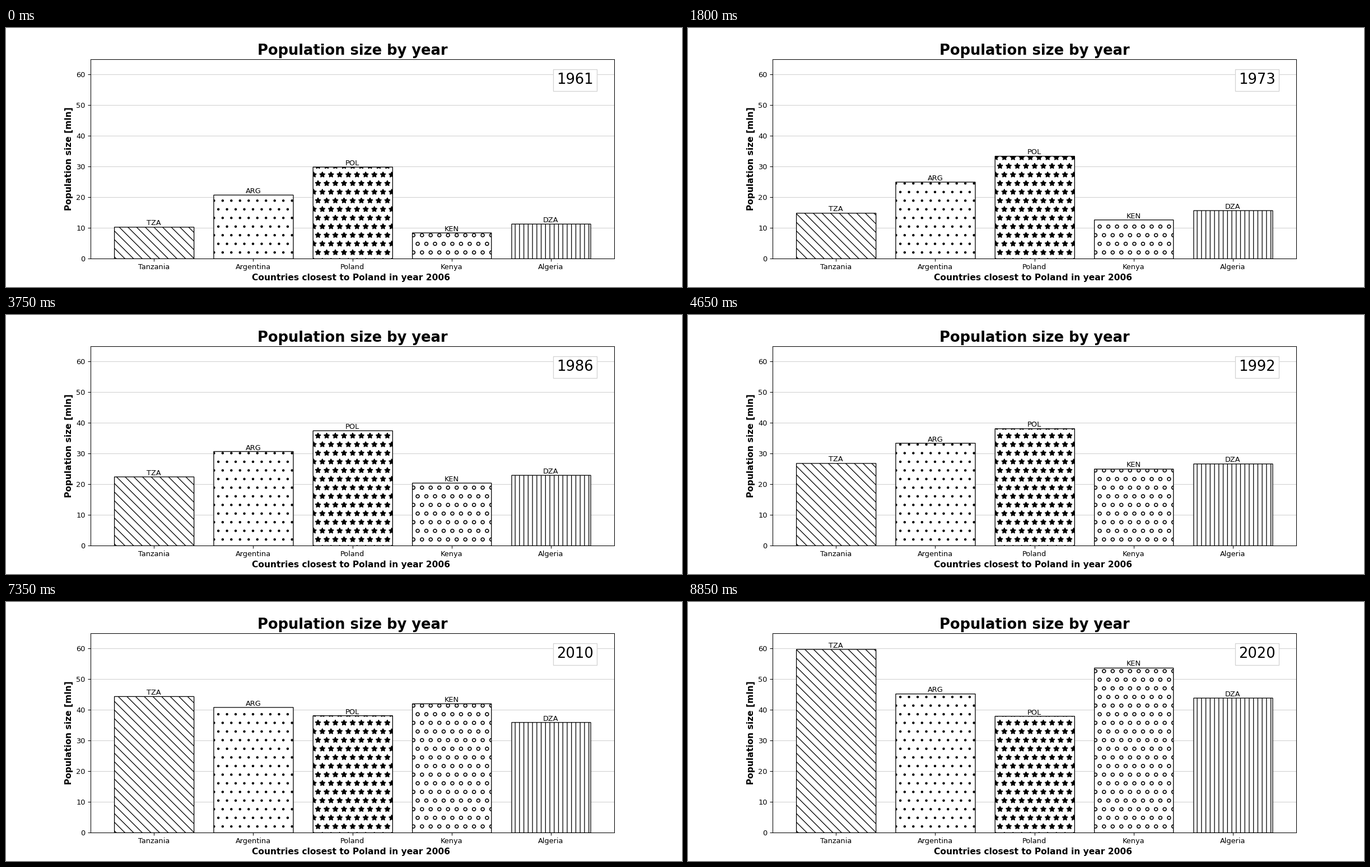
A matplotlib script for the animation above (9 s loop, 1207 by 464 pixels).

```python
import matplotlib.pyplot as plt
import numpy as np
from matplotlib.animation import FuncAnimation
from matplotlib.patches import PathPatch
from matplotlib.path import Path
from matplotlib.transforms import Affine2D

DPI = 92.8
FIG_W, FIG_H = 13.0066, 5
TILES_X, TILES_Y = 13, 5   # texture tiles across the stage
CELL = 1 / 6               # texture cell inside one tile
DOTS = 100                 # edge-rounding steps inside one tile
FIRST_YEAR, LAST_YEAR = 1961, 2020

# Population in millions at every twelfth year
KEY_STEP = 12
COUNTRIES = {
    "TZA": ("Tanzania", [10.35, 14.85, 21.75, 31.0, 43.1, 61.5]),
    "ARG": ("Argentina", [20.8, 25.0, 30.2, 35.6, 40.4, 45.8]),
    "POL": ("Poland", [29.9, 33.4, 37.2, 38.5, 38.1, 37.9]),
    "KEN": ("Kenya", [8.4, 12.6, 19.75, 29.3, 41.0, 55.1]),
    "DZA": ("Algeria", [11.3, 15.7, 22.4, 29.7, 35.3, 44.75]),
}
NAMES = [name for name, _ in COUNTRIES.values()]
LOGS = np.log([keys for _, keys in COUNTRIES.values()])
GROWTH = np.gradient(LOGS, axis=1)


def heights(year):
    """Smooth growth through the key years (cubic Hermite on the logarithm)."""
    i, u = divmod(year - FIRST_YEAR, KEY_STEP)
    u /= KEY_STEP
    blend = u * u * (3 - 2 * u)
    return np.exp(LOGS[:, i] * (1 - blend) + LOGS[:, i + 1] * blend
                  + GROWTH[:, i] * u * (1 - u) ** 2
                  - GROWTH[:, i + 1] * u * u * (1 - u))


def segments(pairs):
    return Path.make_compound_path(*[Path(pair) for pair in pairs])


def diagonals(left, right):
    """Falling lines, one cell apart, over the full height."""
    first = int((left - TILES_Y) / CELL)
    last = int(right / CELL) + 1
    return segments([[(k * CELL, TILES_Y), (k * CELL + TILES_Y, 0)]
                     for k in range(first, last + 1)])


def verticals(left, right):
    step = CELL / 2
    xs = (np.arange(int(left / step), int(right / step) + 1) + 0.5) * step
    return segments([[(x, 0), (x, TILES_Y)] for x in xs])


def lattice(shape, size):
    """Copies of a shape on a staggered grid."""
    def build(left, right):
        cols = range(int(left / CELL) - 1, int(right / CELL) + 3)
        return Path.make_compound_path(*[
            shape.transformed(Affine2D().scale(size * CELL).translate(
                (col + row % 2 / 2) * CELL, TILES_Y - row * CELL))
            for row in range(TILES_Y * 6 + 1) for col in cols])
    return build


CIRCLE = Path.unit_circle()
STAR = Path(Path.unit_regular_star(5).vertices)

# Builder, filled, line width
TEXTURES = [
    (diagonals, False, 1),
    (lattice(CIRCLE, 0.1), True, 1),
    (lattice(STAR, 1 / 3), True, 1),
    (lattice(CIRCLE, 0.19), False, 1.24),
    (verticals, False, 1),
]

fig, ax = plt.subplots(figsize=(FIG_W, FIG_H), dpi=DPI)
fig.patch.set_facecolor("white")
bars = ax.bar(range(5), heights(FIRST_YEAR), width=0.8, snap=False,
              color="white", edgecolor="black", linewidth=1, zorder=2)
ax.set_xlim(-0.64, 4.64)
ax.set_ylim(0, 65)
ax.set_xticks(range(5), NAMES)
ax.set_yticks(range(0, 61, 10))
ax.set_axisbelow(True)
ax.grid(axis="y", color="#d0d0d0", linewidth=0.8)
ax.set_title("Population size by year", fontsize=20, fontweight="bold")
ax.set_xlabel("Countries closest to Poland in year 2006", x=0.4975,
              fontsize=12, fontweight="bold")
ax.set_ylabel("Population size [mln]", fontsize=12, fontweight="bold")

tile_transform = Affine2D().scale(1 / TILES_X, 1 / TILES_Y) + fig.transFigure
data_to_tiles = ax.transData + tile_transform.inverted()


def snap(x, y):
    """Move a data point to the middle of the nearest dot of the tile grid."""
    tx, ty = data_to_tiles.transform((x, y)) * DOTS
    dot = np.floor(tx + 0.5) + 0.5, np.ceil(ty - 0.5) - 0.5
    return data_to_tiles.inverted().transform(np.array(dot) / DOTS)


def place_bar(bar, center, height):
    left, bottom = snap(center - 0.4, 0)
    right, top = snap(center + 0.4, height)
    bar.set_bounds(left, bottom, right - left, top - bottom)


def add_texture(bar, build, filled, width):
    left, right = data_to_tiles.transform(
        [(bar.get_x(), 0), (bar.get_x() + bar.get_width(), 0)])[:, 0]
    patch = PathPatch(build(left, right), fill=filled, facecolor="black",
                      edgecolor="black", linewidth=width, snap=False,
                      transform=tile_transform, zorder=2.1)
    ax.add_artist(patch)
    return patch


textures = [add_texture(bar, *style) for bar, style in zip(bars, TEXTURES)]
labels = [ax.text(i, 0, code, ha="center", va="bottom", fontsize=10, zorder=3)
          for i, code in enumerate(COUNTRIES)]
year_text = ax.text(0.96, 0.895, "", transform=ax.transAxes, fontsize=20,
                    ha="right", va="center", zorder=4,
                    bbox=dict(boxstyle="square,pad=0.25", facecolor="white",
                              edgecolor="lightgray", linewidth=1))


def update(frame):
    year = FIRST_YEAR + frame
    for i, height in enumerate(heights(year)):
        place_bar(bars[i], i, height)
        textures[i].set_clip_path(bars[i])
        labels[i].set_y(height)
    year_text.set_text(str(year))
    return [*bars, *textures, *labels, year_text]


anim = FuncAnimation(fig, update, frames=LAST_YEAR - FIRST_YEAR + 1,
                     interval=150, repeat=True, repeat_delay=0, blit=False)
plt.show()
```
